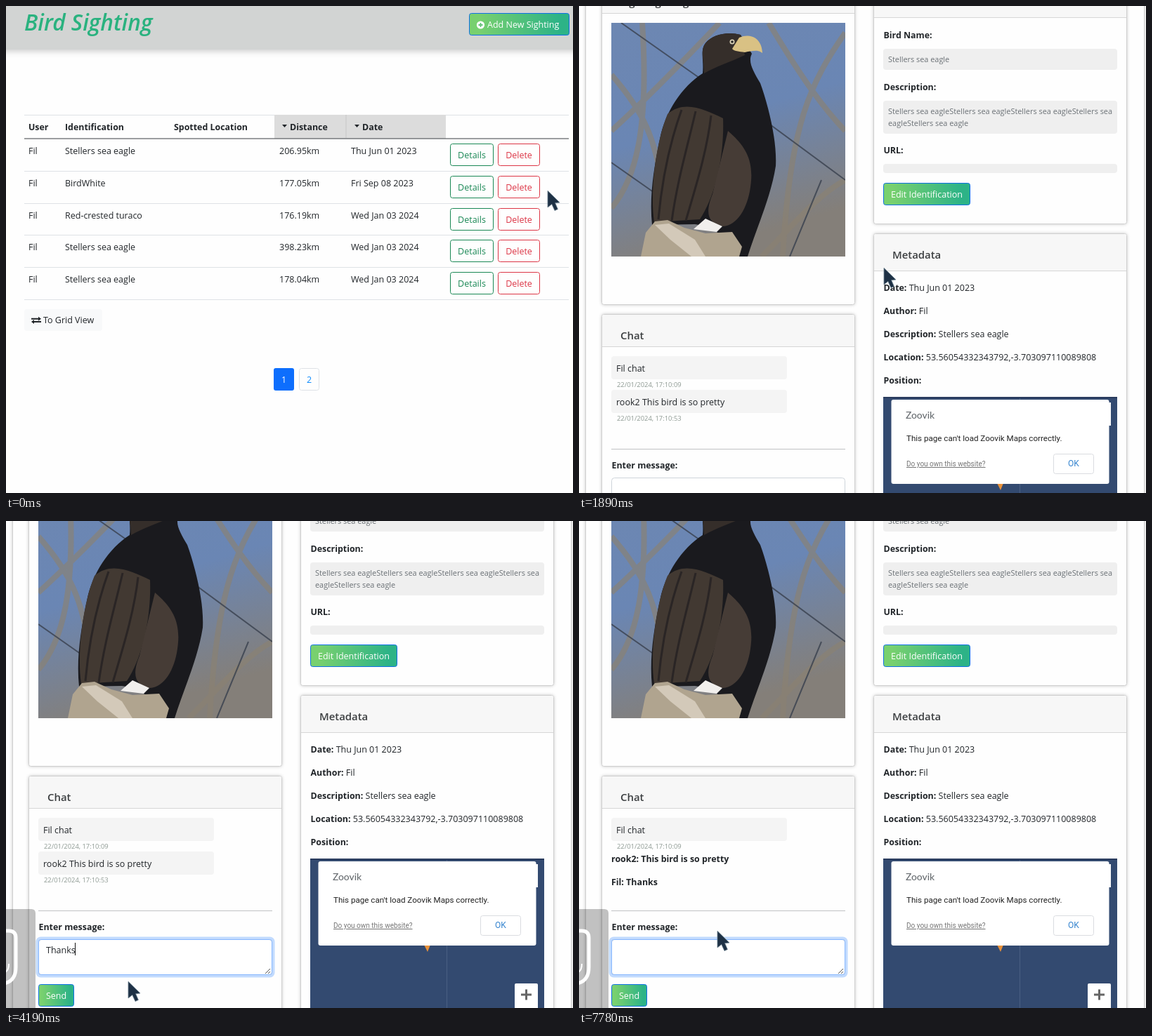
Write an HTML page that moves like this. It is 807 px wide and 694 px high and loops after 8000 ms.

```html
<!DOCTYPE html>
<html lang="en">
<head>
<meta charset="utf-8">
<title>Bird Sighting</title>
<style>
html, body { margin: 0; width: 100%; height: 100%; overflow: hidden; background: #fefefe; }
svg { display: block; width: 807px; height: 694px; }
text { font: 12.5px "Open Sans", "Noto Sans", sans-serif; fill: #212529; }
.b { font-weight: 700; font-size: 12.4px; }
.logo { font: italic 600 31.6px "Open Sans", sans-serif; fill: #2ab27f; }
.h { font-size: 14.9px; font-weight: 600; fill: #3c3f41; }
.w { fill: #fff; }
.in { font-size: 10.9px; fill: #6a7075; }
.time { font-size: 9.4px; fill: #8d9992; }
.mid { text-anchor: middle; }
.map { font: 11.6px Roboto, sans-serif; fill: #222; }
.link { font: 10px Roboto, sans-serif; fill: #757575; text-decoration: underline; }
.card { fill: #fefefe; stroke: #cfcfcf; filter: drop-shadow(0 0 2px rgba(0,0,0,.22)); }
.bar { fill: #d2d4d3; filter: drop-shadow(0 2px 5px rgba(0,0,0,.22)); }

/* timed parts */
.list, .detail, .scroll, .del, .det, .old, .sent, .fresh, .ring, .sendring, .typed,
.caret0, .caret1, .panel, .tip, .arrow, .beam { animation: 8s step-end infinite; }
.detail, .del, .det, .sent, .fresh, .ring, .sendring, .typed, .caret0, .caret1,
.panel, .tip, .beam { opacity: 0; }
.list { animation-name: list; }
.detail { animation-name: detail; }
.scroll { animation-name: scroll; }
.del { animation-name: del; }
.det { animation-name: det; }
.old { animation-name: old; }
.sent { animation-name: sent; }
.fresh { animation-name: fresh; }
.ring { animation-name: ring; }
.sendring { animation-name: sendring; }
.typed { animation-name: typed; }
.caret0 { animation-name: caret0; }
.caret1 { animation-name: caret1; }
.panel { animation-name: panel; }
.tip { animation-name: tip; }
.arrow { animation-name: arrow; }
.beam { animation-name: beam; }
@keyframes list { 13.25% { opacity: 0 } }
@keyframes detail { 13.25% { opacity: 1 } }
@keyframes del { .75% { opacity: 1 } 2.5% { opacity: 0 } }
@keyframes det { 4.125% { opacity: 1 } }
@keyframes old { 73.625% { opacity: 0 } }
@keyframes sent { 59.25% { opacity: 1 } 73.625% { opacity: 0 } }
@keyframes fresh { 73.625% { opacity: 1 } }
@keyframes ring { 36.875% { opacity: 1 } 58.375% { opacity: 0 } 90.5% { opacity: 1 } }
@keyframes sendring { 58.375% { opacity: 1 } 90.5% { opacity: 0 } }
@keyframes typed { 39% { opacity: 1 } 59.25% { opacity: 0 } }
@keyframes caret0 { 36.875% { opacity: 1 } 39% { opacity: 0 } 90.5% { opacity: 1 } 97.25% { opacity: 0 } }
@keyframes caret1 { 39% { opacity: 1 } 44.875% { opacity: 0 } 51.5% { opacity: 1 } 58.125% { opacity: 0 } }
@keyframes panel { 39% { opacity: 1 } 69.25% { opacity: 0 } 91.375% { opacity: 1 } }
@keyframes tip { 71.875% { opacity: 1 } 74.5% { opacity: 0 } }
@keyframes arrow { 34.125% { opacity: 0 } 52.375% { opacity: 1 } 88% { opacity: 0 } 93.875% { opacity: 1 } }
@keyframes beam { 34.125% { opacity: 1 } 52.375% { opacity: 0 } 88% { opacity: 1 } 93.875% { opacity: 0 } }
@keyframes scroll {
  21% { transform: translateY(-20px) }
  21.875% { transform: translateY(-65px) }
  22.75% { transform: translateY(-110px) }
  23.625% { transform: translateY(-152px) }
  24.5% { transform: translateY(-189px) }
  25.375% { transform: translateY(-216px) }
  26.25% { transform: translateY(-228px) }
}
.pointer { animation: pointer 8s linear infinite; }
@keyframes pointer {
  0% { transform: translate(771px, 263px) }
  .75% { transform: translate(771px, 263px); animation-timing-function: steps(5, start) }
  5% { transform: translate(680px, 225px) }
  15.875% { transform: translate(680px, 225px); animation-timing-function: steps(4, start) }
  19.375% { transform: translate(434px, 373px) }
  28.875% { transform: translate(434px, 373px); animation-timing-function: steps(7, start) }
  35% { transform: translate(178px, 612px) }
  49.75% { transform: translate(178px, 612px); animation-timing-function: steps(4, start) }
  53.25% { transform: translate(174px, 656px); animation-timing-function: steps(4, start) }
  56.75% { transform: translate(78px, 674px) }
  69.25% { transform: translate(78px, 674px); animation-timing-function: steps(3, start) }
  71.875% { transform: translate(590px, -40px) }
  80% { transform: translate(522px, -40px) }
  82.75% { transform: translate(522px, -40px); animation-timing-function: steps(7, start) }
  88.875% { transform: translate(160px, 628px) }
  92.125% { transform: translate(160px, 628px); animation-timing-function: steps(4, start) }
  95.625%, 100% { transform: translate(197px, 584px) }
}
</style>
</head>
<body>
<svg id="stage" viewBox="0 0 807 694" xmlns="http://www.w3.org/2000/svg"></svg>
<script>
const text = (x, y, s, cls = '') => `<text x="${x}" y="${y}" class="${cls}">${s}</text>`;
const rect = (x, y, w, h, fill, r = 0, more = '') =>
  `<rect x="${x}" y="${y}" width="${w}" height="${h}" rx="${r}" fill="${fill}" ${more}/>`;
const outline = (x, y, w, h, color, r = 3, fill = 'none') =>
  rect(x + .5, y + .5, w - 1, h - 1, fill, r, `stroke="${color}"`);
const path = (d, fill, more = '') => `<path d="${d}" fill="${fill}" ${more}/>`;
const line = (d, color, width = 1, more = '') =>
  path(d, 'none', `stroke="${color}" stroke-width="${width}" ${more}`);
const group = (cls, ...parts) => `<g class="${cls}">${parts.join('')}</g>`;

const button = (x, y, w, h, label, tx = x + 11, cls = 'w') =>
  outline(x, y, w, h, '#0f70e8', 3, 'url(#green)') + text(tx, y + 20.5, label, cls);

const header = x =>
  rect(-10, -20, 827, 82, '', 0, 'class="bar"') + text(26, 35, 'Bird Sighting', 'logo') +
  button(x, 10, 143, 32, 'Add New Sighting', x + 26) +
  `<circle cx="${x + 16.5}" cy="27" r="5.6" fill="#fff"/>` +
  line(`M${x + 13.5} 27h6m-3-3v6`, '#63c277', 1.8);

// List page
const birds = [
  ['Stellers sea eagle', '206.95km', 'Thu Jun 01 2023'],
  ['BirdWhite', '177.05km', 'Fri Sep 08 2023'],
  ['Red-crested turaco', '176.19km', 'Wed Jan 03 2024'],
  ['Stellers sea eagle', '398.23km', 'Wed Jan 03 2024'],
  ['Stellers sea eagle', '178.04km', 'Wed Jan 03 2024']
];
const smallButton = (x, y, w, label, color, full) =>
  outline(x, y, w, 32, color, 3, full ? color : 'none') +
  `<text x="${x + w / 2}" y="${y + 20.5}" class="mid" style="fill:${full ? '#fff' : color}">${label}</text>`;
const details = (y, full) => smallButton(632, y, 62, 'Details', '#198754', full);
const remove = (y, full) => smallButton(700, y, 60, 'Delete', '#dc3545', full);

const row = ([bird, far, date], i) => {
  const y = Math.round(189 + 45.75 * i), base = y + 22;
  return text(32, base, 'Fil') + text(84, base, bird) + text(389, base, far) +
    text(491, base, date) + details(y + 7) + remove(y + 7) +
    line(`M26 ${Math.round(189 + 45.75 * (i + 1)) + .5}H801`, '#dee2e6');
};
const sortable = (x, label) =>
  path(`M${x - 11} 169h7l-3.5 4z`, '#212529') + text(x, 177, label, 'b');

const list = group('list', header(659),
  line('M26 155.5H801', '#dee2e6'),
  rect(382, 155, 244, 34, '#dcdcdc'), line('M484 155V188', '#c6c6c6'),
  text(32, 177, 'User', 'b'), text(84, 177, 'Identification', 'b'),
  text(239, 177, 'Spotted Location', 'b'), sortable(404, 'Distance'), sortable(507, 'Date'),
  birds.map(row).join(''), line('M26 189H801', '#3b3f42'),
  group('del', remove(242, true)), group('det', details(196, true)),
  rect(26, 432, 111, 31, '#f8f9fa', 4),
  path('M36 444.8h10v-2l4 3-4 3v-2h-10zM50 449h-10v-2l-4 3 4 3v-2h10z', '#212529'),
  text(53, 452, 'To Grid View'),
  rect(381, 516, 29, 32, '#0d6efd', 3), text(395.5, 536.5, '1', 'w mid'),
  outline(417, 516, 29, 32, '#dee2e6', 3),
  '<text x="431.5" y="536.5" class="mid" style="fill:#0d8bfd">2</text>');

// Detail page
const card = (x, y, w, h, head, title) =>
  rect(x + .5, y + .5, w, h, '', 3, 'class="card"') + rect(x + 1, y + 1, w - 1, head, '#f7f7f7', 2) +
  line(`M${x + 1} ${y + head + .5}h${w - 1}`, '#d6d6d6') + text(x + 27, y + 35.5, title, 'h');
const field = (y, h) => rect(433, y, 333, h, '#efefef', 4);
const fact = (y, name, value = '') =>
  text(433.5, y, `<tspan class="b">${name}:</tspan> ${value}`);
const bubble = (y, s, time) =>
  rect(46, y, 250, 33, '#f4f4f4', 4) + text(53, y + 21.5, s) + text(54, y + 44, time, 'time');

const eagle = 'Stellers sea eagle';
const photo = `<g clip-path="url(#frame)">` +
  rect(46, 176, 333, 333, 'url(#sky)') +
  line('M46 330C90 290 130 250 200 176M46 440C80 400 100 330 90 176M379 190C330 260 300 320 290 509M270 176C320 260 350 300 379 330M46 250C90 300 110 340 120 420M379 400C340 420 300 470 260 509',
    '#8b8172', 8, 'opacity=".65"') +
  line('M60 176L182 262M46 375L110 420M268 318L379 400M300 509L345 400', '#39404e', 2, 'opacity=".8"') +
  path('M180 205C190 192 212 188 230 193L246 220C240 232 248 245 258 262C270 295 282 345 280 380C273 425 252 470 240 509H222C212 480 190 466 165 463L104 464C100 425 106 385 115 342C122 305 145 268 176 248C178 230 172 215 180 205Z', '#1a1a1e') +
  path('M126 306C150 285 180 300 205 312C207 360 196 420 172 456L107 460C101 420 108 350 126 306Z', '#423932') +
  path('M212 330C235 350 250 370 244 410C240 440 225 465 205 466C185 462 178 450 190 420Z', '#463c36') +
  line('M146 300C128 350 118 400 113 456M166 302C155 350 140 400 132 458M188 308C182 360 166 410 152 458', '#2a2525', 3) +
  path('M180 205C190 192 212 188 230 193L236 222C215 232 195 238 178 248C178 230 172 215 180 205Z', '#352e2a') +
  path('M228 197C245 190 260 198 261 219C255 214 247 216 236 218C228 217 220 216 218 213Z', '#d9c184') +
  '<circle cx="218" cy="203" r="3.5" fill="#d8d0b5"/><circle cx="218" cy="203" r="1.8" fill="#222"/>' +
  path('M163 470L180 455L204 466L196 474Z', '#f1efed') +
  path('M95 475L108 459L126 457L150 468L180 476L218 474L232 495L228 509H88Z', '#b0a48f') +
  path('M108 464L128 462L165 485L180 509H160L130 485Z', '#d3c9b9') + '</g>';

const map = rect(433, 709, 333, 240, '#334a70') + rect(433, 709, 333, 2, '#293b5d') +
  line('M627.5 711V940', '#4a5f83') + rect(750, 717, 7, 33, '#fff') +
  path('M595 832h9l-4 10z', '#e8913a') +
  rect(444.5, 713, 310, 120, '#fff', 3) +
  '<text x="465" y="740" style="font:500 13.8px Lato,sans-serif;fill:#676c70">Zoovik</text>' +
  text(466, 772, 'This page can\'t load Zoovik Maps correctly.', 'map') +
  text(466, 808, 'Do you own this website?', 'link') +
  outline(675, 790, 58, 29, '#dadce0', 3) +
  '<text x="704" y="808" class="mid" style="font:12px Roboto,sans-serif;fill:#3584cf">OK</text>' +
  rect(724, 887, 33, 60, '#fff', 2) + line('M733 903h15m-7.5-7.5v15', '#666', 3);

const caret = (x, cls) => rect(x, 829, 1, 18, '#111', 0, `class="${cls}"`);

const detail = group('detail', group('scroll', header(643),
  rect(9.5, 89.5, 795, 960, '', 3, 'class="card"'),
  card(32, 116, 360, 461, 46, 'Sighting Image'), photo,
  card(419, 116, 360, 346, 52, 'Identification Form'),
  text(433.5, 198, 'Bird Name:', 'b'), field(213, 30), text(440, 232, eagle, 'in'),
  text(433.5, 272, 'Description:', 'b'), field(287, 47),
  text(440, 305.5, eagle.repeat(3) + 'Stellers sea', 'in'), text(440, 323, 'eagle' + eagle, 'in'),
  text(433.5, 362, 'URL:', 'b'), field(377, 13),
  button(433, 404, 124, 32, 'Edit Identification'),
  card(419, 476, 360, 560, 53, 'Metadata'),
  fact(558, 'Date', 'Thu Jun 01 2023'), fact(591, 'Author', 'Fil'),
  fact(624, 'Description', eagle), fact(657, 'Location', '53.56054332343792,-3.703097110089808'),
  fact(690, 'Position'), map,
  card(32, 591, 360, 420, 46, 'Chat'),
  bubble(651, 'Fil chat', '22/01/2024, 17:10:09'),
  group('old', bubble(699, 'rook2 This bird is so pretty', '22/01/2024, 17:10:53')),
  group('sent', text(46, 762, 'Fil: Thanks', 'b')),
  group('fresh', text(46, 714, 'rook2: This bird is so pretty', 'b'), text(46, 747, 'Fil: Thanks', 'b')),
  line('M46 783.5H379', '#c0c2c4'), text(46.5, 811, 'Enter message:', 'b'),
  outline(46, 824, 333, 51, '#ced4da', 4, '#fff'),
  group('ring', rect(44.5, 822.5, 336, 54, 'none', 5, 'stroke="#c2dbfe" stroke-width="4"'),
    outline(46, 824, 333, 51, '#86b7fe')),
  line('M369 873l7-7m-3 7l3-3', '#555'),
  group('typed', text(57, 844, 'Thanks')),
  caret(57, 'caret0'), caret(98, 'caret1'),
  group('sendring', rect(44.5, 886.5, 54, 35, 'none', 5, 'stroke="#98c1fe" stroke-width="4"')),
  button(46, 888, 51, 32, 'Send')));

// Overlays
const panel = group('panel',
  path('M0 553H36Q42 553 42 559V694H0Z', '#000', 'opacity=".24"'),
  line('M-2 584H4Q14 584 14 594V636Q14 655 -2 659', '#fff', 5) +
  line('M4 631Q4 640 -1 643', '#fff', 2));

const tip = group('tip',
  path('M482 -10H720V134Q720 141 713 141H489Q482 141 482 134Z', '#202124',
    'style="filter:drop-shadow(0 1px 2px rgba(0,0,0,.5))"'),
  path('M482 103H720V134Q720 141 713 141H489Q482 141 482 134Z', '#2b2b2c'),
  '<circle cx="601" cy="37" r="26.5" fill="#5f6164"/>',
  path('M580 31L594 44Q601 43 602 50V58Q582 56 579 39ZM604 16H612Q622 25 622 37Q620 46 616 49Q612 42 606 41V34H594V28H601V22H606Z', '#202124'),
  line('M498 127A5.5 5.5 0 1 1 505 127ZM501 123L504 119', '#c4c4c4', 1.4),
  '<text x="516" y="126.5" style="font-size:10.7px;font-weight:500;fill:#c2c2c2">Memory usage: 67.7 MB</text>');

const pointer = group('pointer',
  group('arrow', path('M0 .3V24L5.8 19.4L10 28.6L14.4 26.5L10.6 17.7L17 17Z', '#1e3145',
    'stroke="#6f8592" stroke-width=".8"')),
  group('beam', line('M-3 0Q0 0 0 2Q0 0 3 0M0 2V14M-3 16Q0 16 0 14Q0 16 3 16', '#222', 1)));

document.getElementById('stage').innerHTML = `<defs>
  <linearGradient id="green"><stop offset=".1" stop-color="#78d06f"/><stop offset=".9" stop-color="#2db387"/></linearGradient>
  <linearGradient id="sky" x2=".3" y2="1"><stop stop-color="#6d87b2"/><stop offset=".5" stop-color="#6a86b4"/><stop offset="1" stop-color="#847f79"/></linearGradient>
  <clipPath id="frame">${rect(46, 176, 333, 333, '#000')}</clipPath>
</defs>` + list + detail + panel + tip + pointer;
</script>
</body>
</html>
```
